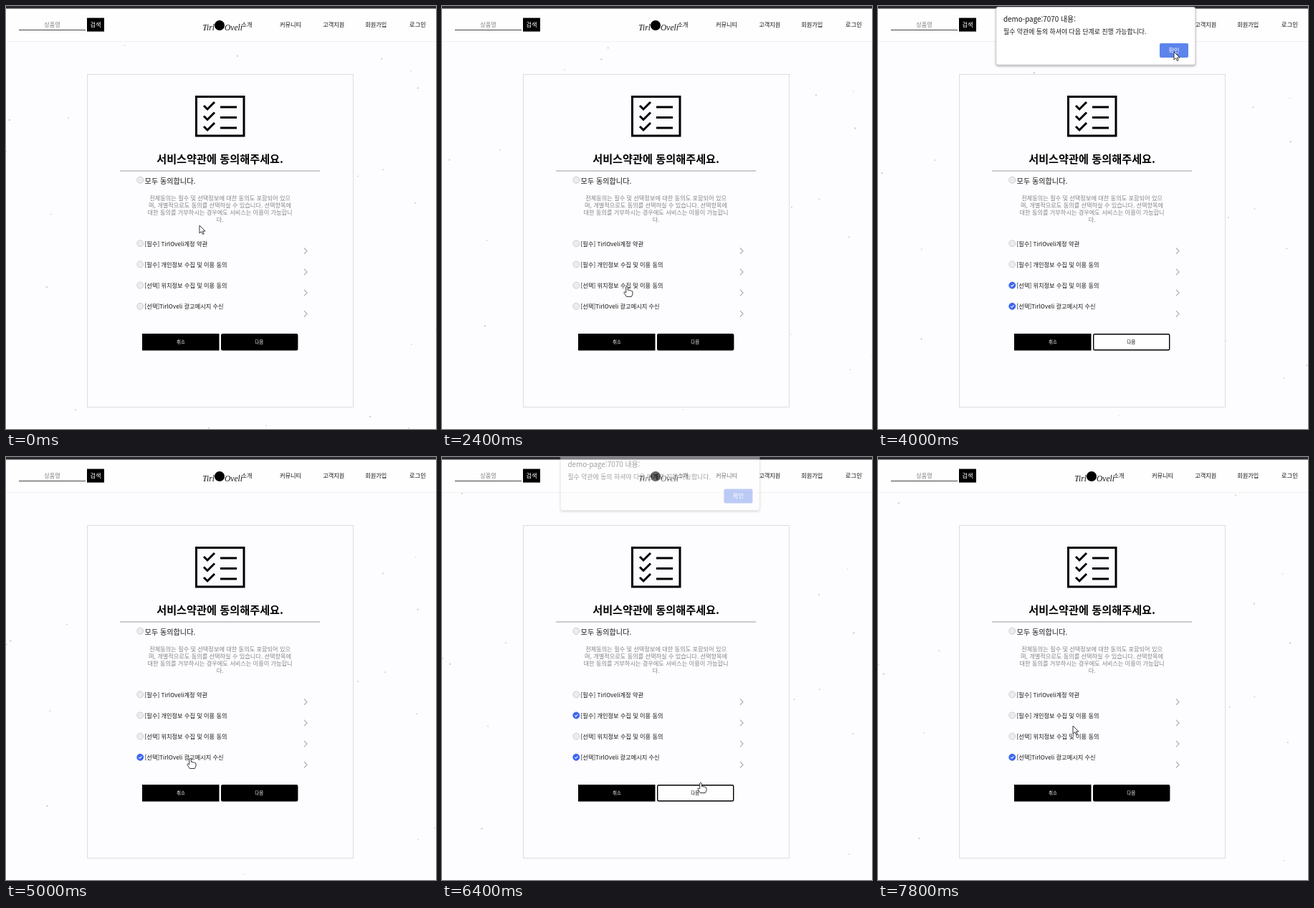
Recreate the animation shown at these times as an HTML page. Size 600 by 590 pixels, loop 8000 ms.

```html
<!DOCTYPE html>
<html lang="ko">
<head>
<meta charset="utf-8">
<title>서비스약관</title>
<style>
  html, body { margin: 0; height: 100%; overflow: hidden; background: #fdfcfe; }
  svg { display: block; width: 100vw; height: 100vh; }
  text { font: 8.2px 'Noto Sans CJK KR', 'Noto Sans CJK', 'Noto Sans', sans-serif; fill: #181818; }
  .mid { text-anchor: middle; }
  .end { text-anchor: end; }
  .nav { font-weight: 500; fill: #111; }
  .soft { fill: #858488; }
  .light { fill: #fff; font-weight: 500; }
  .title { font-size: 15.2px; font-weight: 700; fill: #000; }
  .all { font-size: 10.1px; }
  .small { font-size: 6.5px; font-weight: 500; }
  .brand { font: italic 11.5px 'Liberation Serif', serif; fill: #111; }
  .host { font-size: 9.9px; }
  .notice { font-size: 8.9px; }
  .line { fill: none; stroke: #000; stroke-width: 3; }
  .chevron { fill: none; stroke: #adacb0; stroke-width: 1.2; }
  .radio circle { fill: #ececee; stroke: #c9c8cc; stroke-width: .9; }
  .radio path { fill: none; stroke: none; }
  .radio.on circle { fill: #3b66f0; stroke: #3b66f0; }
  .radio.on path { stroke: #fff; stroke-width: 1.1; }
  #next rect { fill: #000; stroke: #000; stroke-width: 1.4; }
  #next text { fill: #fff; }
  #next.hover rect { fill: #fff; }
  #next.hover text { fill: #000; }
  #cursor path { fill: #fff; stroke: #222; stroke-width: .9; stroke-linejoin: round; }
</style>
</head>
<body>
<svg id="stage" viewBox="0 0 600 590"></svg>
<script>
const LOOP = 8000, STEP = 200, MOVE = 600;
const BRAND = ['Tirl', 'Oveli'];
const rowY = i => i ? 302.3 + 29.2 * i : 243;

const toggle = i => ({ row: i, x: i ? 258 : 241, y: rowY(i) + 5 });
const submit = { x: 361, y: 458, opens: true };
const confirm = { x: 413, y: 64, closes: true };

// The pointer reaches each stop one step early and acts on it at the given time
const STOPS = [
  [0, { x: 270, y: 306 }],
  [1000, toggle(0)], [1600, toggle(0)],
  [2600, toggle(3)], [2800, toggle(4)], [3200, submit], [4200, confirm],
  [4600, toggle(3)], [5200, { x: 257, y: 424 }],
  [5600, toggle(2)], [6400, submit], [7400, confirm],
  [7600, toggle(2)], [LOOP, { x: 272, y: 375 }]
].map(([at, target]) => ({ at, ...target }));

let seed = 11;
const random = (min, max) => {
  seed = (seed * 16807) % 2147483647;
  return min + (max - min) * seed / 2147483647;
};
const DOTS = Array.from({ length: 38 }, () => ({
  x: random(0, 600), y: random(-110, 590), speed: random(9, 25),
  sway: random(1, 6), period: random(3, 7), phase: random(0, 7)
}));

const text = (x, y, cls, s) => `<text x="${x}" y="${y}" class="${cls}">${s}</text>`;
const rect = (x, y, w, h, attrs = '') => `<rect x="${x}" y="${y}" width="${w}" height="${h}" ${attrs}/>`;
const path = (d, cls) => `<path d="${d}" class="${cls}"/>`;

function header() {
  const nav = ['소개', '커뮤니티', '고객지원', '회원가입', '로그인'];
  return rect(0, 0, 600, 49, 'fill="#fefefe"') + rect(0, 49, 600, 1, 'fill="#f1f0f3"') +
    rect(0, 0, 600, 3.6, 'fill="#2c2a30"') +
    text(64.5, 29.2, 'mid soft', '상품명') + rect(18, 33, 93, 1, 'fill="#444"') +
    rect(113, 16.6, 24, 19) + text(125, 29.2, 'mid light', '검색') +
    text(291, 33.5, 'brand end', BRAND[0]) + '<circle cx="298" cy="27" r="7"/>' +
    text(305, 33.5, 'brand', BRAND[1]) +
    nav.map((s, i) => text(336 + 59.6 * i - .5 * (i - 2) ** 2 + 2, 29.2, 'mid nav', s)).join('');
}

function card() {
  const name = BRAND.join('');
  const labels = ['모두 동의합니다.', `[필수] ${name}계정 약관`, '[필수] 개인정보 수집 및 이용 동의',
    '[선택] 위치정보 수집 및 이용 동의', `[선택]${name} 광고메시지 수신`];
  const details = ['전체동의는 필수 및 선택정보에 대한 동의도 포함되어 있으',
    '며, 개별적으로도 동의를 선택하실 수 있습니다. 선택항목에',
    '대한 동의를 거부하시는 경우에도 서비스는 이용이 가능합니', '다.'];
  const icon = [140, 154.5, 169].map(y =>
    path(`M276 ${y - 1}l5 5l10 -10M299 ${y + 1}h23`, 'line')).join('');
  const rows = labels.map((label, i) => {
    const y = rowY(i);
    return `<g class="radio" transform="translate(187.3 ${y - .3})"><circle r="4.5"/><path d="M-2 0l1.5 1.5l2.7 -2.9"/></g>` +
      text(193.6, y + (i ? 3.2 : 4.6), i ? '' : 'all', label) +
      (i ? path(`M416 ${y + 6}l4 4.2l-4 4.2`, 'chevron') : '');
  }).join('');
  return rect(113.5, 95.5, 371, 464, 'fill="#fdfcfe" stroke="#dddce0"') +
    rect(265.5, 126.5, 66.5, 54.5, 'class="line"') + icon +
    text(298.6, 219.3, 'title mid', '서비스약관에 동의해주세요.') +
    rect(159, 229.5, 279, 1, 'fill="#9b9a9e"') + rows +
    details.map((s, i) => text(298.6, 271.2 + 10 * i, 'mid soft', s)).join('') +
    rect(190, 457, 107.5, 23.5) + text(244, 471.2, 'mid light small', '취소') +
    `<g id="next">${rect(300.7, 457.7, 106, 22, 'rx="1.5"')}${text(353.3, 471.2, 'mid small', '다음')}</g>`;
}

function dialog() {
  return '<g id="dialog">' +
    rect(164.8, 1.5, 278, 80.5, 'rx="3" fill="#fff" stroke="#c4c3c7" stroke-width=".8" filter="url(#shadow)"') +
    text(175, 21.5, 'host', 'demo-page:7070 내용:') +
    text(175, 39, 'notice', '필수 약관에 동의 하셔야 다음 단계로 진행 가능합니다.') +
    rect(393, 52, 40, 20, 'rx="2" fill="#5d84ec"') + text(413, 65, 'mid light', '확인') + '</g>';
}

const stage = document.getElementById('stage');
stage.innerHTML =
  '<defs><filter id="shadow"><feDropShadow dx="0" dy="1.5" stdDeviation="1.5" flood-opacity=".35"/></filter></defs>' +
  rect(0, 0, 600, 590, 'fill="#fdfcfe"') +
  DOTS.map(d => `<circle class="dot" r="${.3 + d.speed / 26}" fill="#d0cfd4"/>`).join('') +
  header() + card() + dialog() +
  '<g id="cursor"><path id="arrow" d="M0 0V11L2.6 8.6L4.5 12.5L6.2 11.7L4.4 8H8Z"/>' +
  '<path id="hand" d="M-1.3 5V-3Q0 -5 1.3 -3V1.5Q3 .6 3.9 2Q5.5 1.3 6.3 2.7Q8 2.3 8 4.2V7L6.4 10.5H-.5L-4 5.5Q-4 3.3 -2.5 4Z"/></g>';

const $ = id => document.getElementById(id);
const dots = stage.querySelectorAll('.dot');
const radios = stage.querySelectorAll('.radio');
const show = (el, visible) => el.setAttribute('visibility', visible ? 'visible' : 'hidden');

// Replays all actions up to time t
function stateAt(t) {
  const checked = Array(5).fill(false);
  let openedAt = null, halted = 0;
  for (const stop of STOPS.filter(s => s.at <= t)) {
    if (stop.row === 0) checked.fill(!checked[0]);
    else if (stop.row) checked[stop.row] = !checked[stop.row];
    if (stop.opens) openedAt = stop.at;
    if (stop.closes) {
      halted += stop.at - STEP - openedAt;
      openedAt = null;
    }
  }
  const openFor = openedAt === null ? -1 : t - openedAt;
  return { checked, openFor, halted: halted + Math.min(Math.max(openFor, 0), 800) };
}

function pointer(t) {
  const i = STOPS.findIndex(s => s.at > t);
  const from = STOPS[i - 1], to = STOPS[i];
  const end = to.at - STEP, begin = Math.max(from.at, end - MOVE);
  const u = end > begin ? Math.min(1, Math.max(0, (t - begin) / (end - begin))) : 1;
  const k = u * u * (3 - 2 * u);
  return [from.x + (to.x - from.x) * k, from.y + (to.y - from.y) * k];
}

function draw(t) {
  const { checked, openFor, halted } = stateAt(t);
  const seconds = (t - halted) / 1000; // the page halts behind the dialog
  DOTS.forEach((d, i) => {
    dots[i].setAttribute('cx', d.x + d.sway * Math.sin(2 * Math.PI * seconds / d.period + d.phase));
    dots[i].setAttribute('cy', d.y + d.speed * seconds);
  });
  radios.forEach((r, i) => r.classList.toggle('on', checked[i]));

  const open = openFor >= 0, opening = open && openFor < STEP;
  show($('dialog'), open);
  $('dialog').setAttribute('opacity', opening ? .4 : 1);
  $('dialog').setAttribute('transform', opening ? 'translate(.4 -7.6)' : '');

  const [x, y] = pointer(t);
  const overNext = x > 300 && x < 407 && y > 457 && y < 480;
  const overRow = x > 183 && x < 310 && checked.some((_, i) => Math.abs(y - rowY(i)) < 10);
  const hand = overNext || overRow;
  $('next').classList.toggle('hover', open || overNext);
  show($('hand'), hand);
  show($('arrow'), !hand);
  $('cursor').setAttribute('transform', `translate(${x} ${y})`);
}

const start = performance.now();
function tick() {
  const t = (performance.now() - start) % LOOP;
  draw(Math.floor(t / STEP) * STEP);
  requestAnimationFrame(tick);
}
tick();
</script>
</body>
</html>
```
